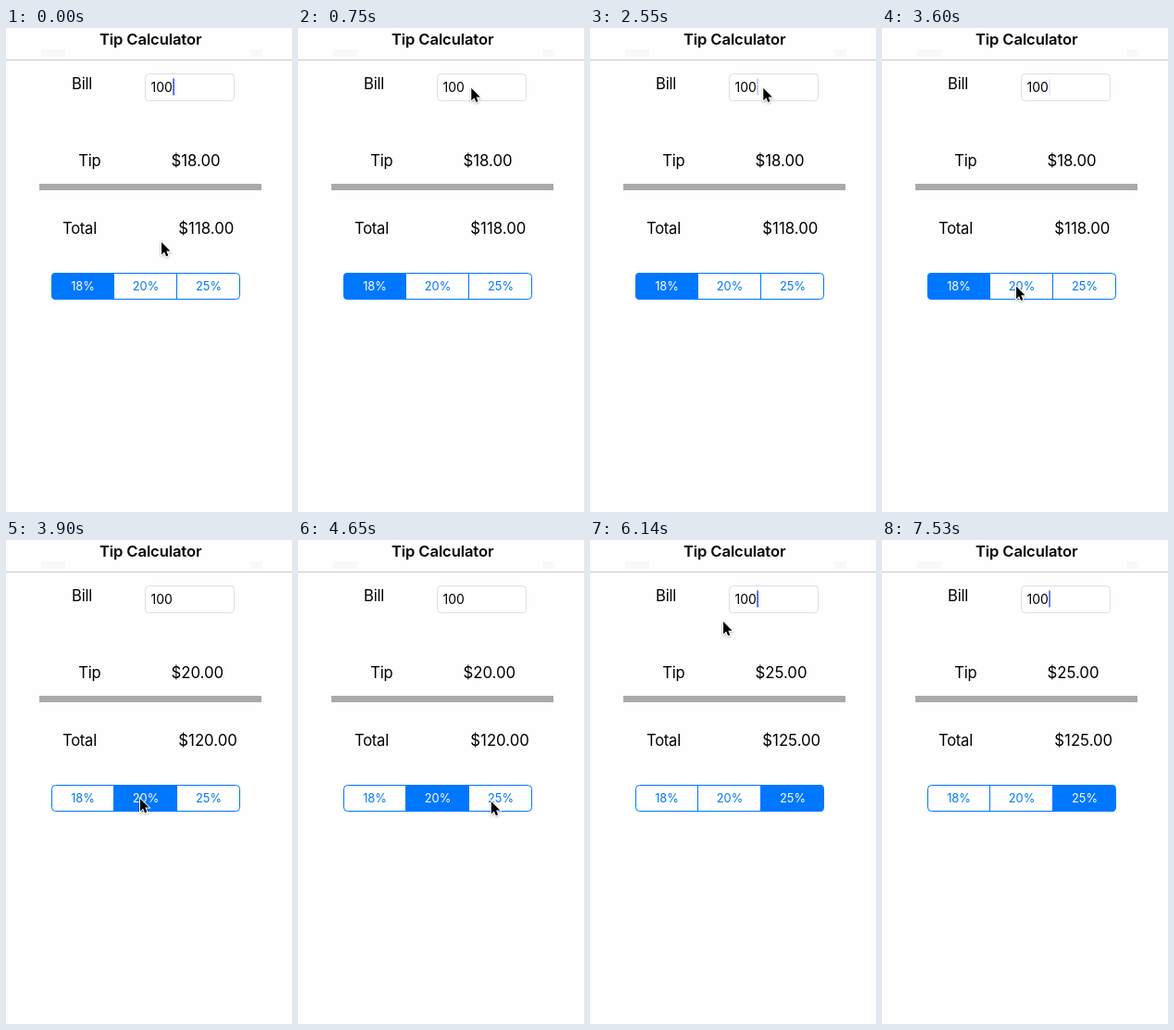
Animation of 309x522 px, one loop 7.63 s. Source, as an HTML page:

```html
<!DOCTYPE html>
<html lang="en">
<head>
<meta charset="utf-8">
<title>Tip Calculator</title>
<style>
  html, body { margin: 0; width: 100%; height: 100%; overflow: hidden; background: #fefefe; }
  svg { display: block; width: 309px; height: 522px; }
  text { font-family: Inter, Roboto, sans-serif; font-size: 16.6px; letter-spacing: -.25px; fill: #000; }
  .title { font-weight: 600; letter-spacing: -.12px; text-anchor: middle; }
  .bill { font-size: 14px; letter-spacing: 0; }
  .money { font-size: 16.8px; letter-spacing: 0; }
  .rate { font-size: 12.8px; letter-spacing: 0; text-anchor: middle; }
</style>
</head>
<body>
<svg viewBox="0 0 309 522">
  <defs>
    <clipPath id="pill"><rect x="49" y="264" width="204" height="29" rx="4.5"/></clipPath>
    <filter id="shade" x="-50%" y="-50%" width="200%" height="200%">
      <feDropShadow dx="0" dy="1" stdDeviation=".8" flood-opacity=".35"/>
    </filter>
  </defs>
  <rect width="309" height="522" fill="#fefefe"/>
  <path d="M38 23h26v8h-26zM264 23h13v8h-13z" fill="#f8f8f8"/>
  <rect y="34" width="309" height="1" fill="#cbcbcb"/>
  <text class="title" x="156.2" y="18">Tip Calculator</text>

  <text x="71.1" y="66">Bill</text>
  <rect x="150.5" y="49.5" width="96" height="29" rx="4" fill="#fff" stroke="#dedede"/>
  <text class="bill" x="156.6" y="69">100</text>
  <rect id="caret" x="180.2" y="54.5" width="1.8" height="18" fill="#4668ea"/>

  <text x="78.2" y="149">Tip</text>
  <text id="tip" class="money" x="178.4" y="149"></text>
  <rect x="36" y="168" width="240" height="7" fill="#aaa"/>
  <text x="61" y="222">Total</text>
  <text id="total" class="money" x="186.3" y="222"></text>

  <rect id="fill" y="264" width="68.5" height="29" fill="#0077ff" clip-path="url(#pill)"/>
  <path d="M116.5 264v29M184.5 264v29" stroke="#0077ff"/>
  <rect x="49.5" y="264.5" width="203" height="28" rx="4" fill="none" stroke="#0077ff"/>
  <text class="rate" x="83" y="283.2">18%</text>
  <text class="rate" x="151" y="283.2">20%</text>
  <text class="rate" x="219" y="283.2">25%</text>

  <path id="arrow" d="M0 0V13.4L3.1 10.5L5.1 15.2L7.3 14.3L5.3 9.6H9.5Z" fill="#000"
    stroke="#fff" stroke-width="1.8" paint-order="stroke" filter="url(#shade)"/>
</svg>
<script>
const LOOP = 7630;
const STEP = 149.5;
const BLINK = 1010;
const HIDE = 6700;
const $ = id => document.getElementById(id);
const [caret, tip, total, fill, arrow] = ['caret', 'tip', 'total', 'fill', 'arrow'].map($);
const labels = document.querySelectorAll('.rate');

const rates = [18, 20, 25];
const taps = [3880, 4930];

const home = { x: 168, y: 231 };
const moves = [
  { from: 0, to: 750, x: 187.3, y: 64.8 },
  { from: 3000, to: 3600, x: 145, y: 279 },
  { from: 4200, to: 4650, x: 209, y: 282 },
  { from: 5390, to: 6140, x: 144, y: 88 },
  { from: 6140, to: 6580, x: 226, y: 367.5 }
];

const ramp = (t, a, b) => Math.min(1, Math.max(0, (t - a) / (b - a)));
const ease = u => u * u * (3 - 2 * u);
const money = n => '$' + n.toFixed(2);

function caretOpacity(t) {
  const p = t % BLINK;
  return 1 - ramp(p, 385, 585) + ramp(p, 880, 980);
}

function pointer(t) {
  return moves.reduce((p, m) => {
    const e = ease(ramp(t, m.from, m.to));
    return { x: p.x + (m.x - p.x) * e, y: p.y + (m.y - p.y) * e };
  }, home);
}

function draw(ms) {
  const t = Math.floor(ms % LOOP / STEP) * STEP;
  const pick = taps.filter(tap => t >= tap).length;
  const { x, y } = pointer(t);
  caret.setAttribute('opacity', caretOpacity(t));
  tip.textContent = money(rates[pick]);
  total.textContent = money(100 + rates[pick]);
  fill.setAttribute('x', 48.5 + 67.75 * pick);
  labels.forEach((label, i) => { label.style.fill = i === pick ? '#fff' : '#0077ff'; });
  arrow.setAttribute('transform', `translate(${x} ${y})`);
  arrow.style.display = t < HIDE ? '' : 'none';
}

let start;
function tick(now) {
  start ??= now;
  draw(now - start);
  requestAnimationFrame(tick);
}
draw(0);
requestAnimationFrame(tick);
</script>
</body>
</html>
```
